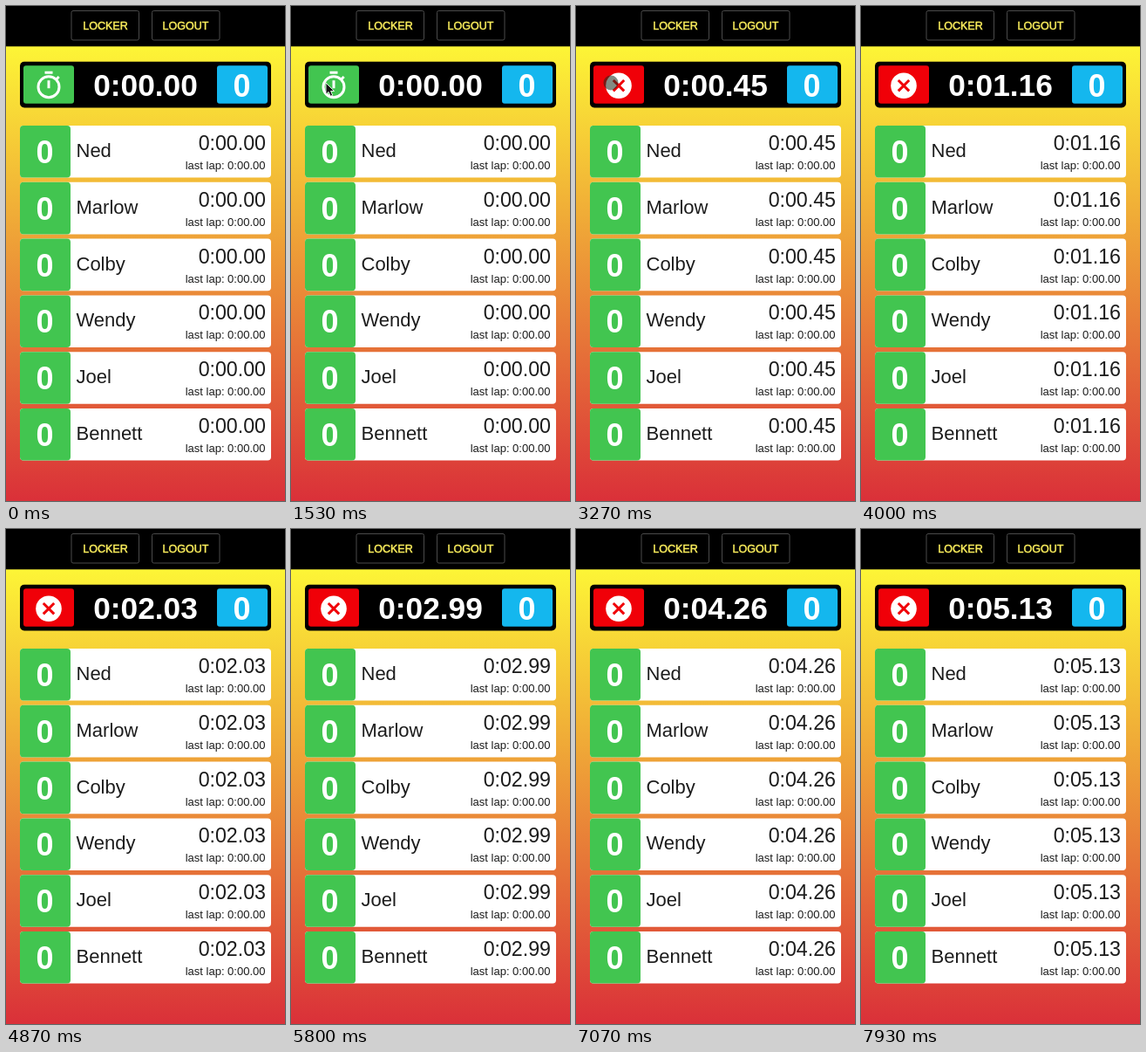
An HTML page that plays this animation: 320x567 px, repeating every 8 s.

```html
<!DOCTYPE html>
<html lang="en">
<head>
<meta charset="utf-8">
<title>Lap timer</title>
<style>
html, body { margin: 0; width: 100%; height: 100%; overflow: hidden; background: #000; }
svg { display: block; width: 100vw; height: 100vh; font-family: "Liberation Sans", Arial, sans-serif; }
.nav rect { fill: none; stroke: #4a4a4a; }
.nav text { fill: #fbee5c; stroke: #fbee5c; stroke-width: .5; font-size: 12.5px; text-anchor: middle; }
.big { fill: #fff; font-weight: bold; font-size: 36px; text-anchor: middle; }
#clock { font-size: 35.3px; }
.name { font-size: 22px; }
.time { font-size: 23.2px; text-anchor: end; }
.lap { font-size: 13px; text-anchor: end; }
.name, .time, .lap { fill: #1c1c1c; }
</style>
</head>
<body>
<svg viewBox="0 0 320 567" preserveAspectRatio="none">
  <defs>
    <linearGradient id="sky" x1="0" y1="0" x2="0" y2="1">
      <stop offset="0" stop-color="#fdf536"/>
      <stop offset="1" stop-color="#da3039"/>
    </linearGradient>
  </defs>
  <rect y="46" width="320" height="521" fill="url(#sky)"/>
  <rect width="320" height="46.3" fill="#000"/>
  <g class="nav">
    <rect x="75" y="5.5" width="77.5" height="33.5" rx="2"/>
    <text x="114" y="26.8">LOCKER</text>
    <rect x="167.5" y="5.5" width="77.5" height="33.5" rx="2"/>
    <text x="206" y="26.8">LOGOUT</text>
  </g>

  <rect x="16" y="63.8" width="288" height="52.7" rx="5" fill="#000"/>
  <rect id="button" x="20" y="68.3" width="58" height="43.5" rx="3" fill="#42c550"/>
  <g id="ready" transform="translate(31 73.2) scale(1.5)" fill="none" stroke="#fff" stroke-width="2">
    <circle cx="12" cy="13" r="8"/>
    <path d="M9 2h6M12 8v6M18 7l1.8-1.8"/>
  </g>
  <g id="running" transform="translate(49 91.2)">
    <circle r="14.8" fill="#fff"/>
    <path d="M-6.2-6.2 6.2 6.2M6.2-6.2-6.2 6.2" stroke="#f00008" stroke-width="3"/>
  </g>
  <text id="clock" class="big" x="160" y="103.2"></text>
  <rect x="242" y="68.3" width="58" height="43.5" rx="3" fill="#14b7ee"/>
  <text class="big" x="270.5" y="103.6">0</text>

  <g id="rows"></g>

  <g id="pointer">
    <path id="arrow" d="M0 0V13.2L3.1 10.4 5.3 15.3 7.7 14.2 5.6 9.5H9.6Z" fill="#111" stroke="#fff" stroke-width=".9"/>
    <circle id="touch" r="8.5" fill="#1c2b1e" fill-opacity=".55"/>
  </g>
</svg>
<script>
const LOOP = 8000, FRAME = 1000 / 15;
const START = 2790, TICK = 50.8;
const HOVER = 2200;
const names = ["Ned", "Marlow", "Colby", "Wendy", "Joel", "Bennett"];
const $ = id => document.getElementById(id);

$("rows").innerHTML = names.map((name, i) => `
  <g transform="translate(16 ${137 + i * 64.8})">
    <rect width="288" height="59.6" rx="4" fill="#fff"/>
    <rect width="58" height="59.6" rx="4" fill="#42c550"/>
    <text class="big" x="28.5" y="43">0</text>
    <text class="name" x="64.5" y="36">${name}</text>
    <text class="time" x="282" y="28"></text>
    <text class="lap" x="281.5" y="50">last lap: 0:00.00</text>
  </g>`).join("");
const times = [...document.querySelectorAll(".time")];

const show = (id, on) => $(id).setAttribute("visibility", on ? "visible" : "hidden");

function ease(t, from, to) {
  const p = Math.min(1, Math.max(0, (t - from) / (to - from)));
  return p * p * (3 - 2 * p);
}

function format(ms) {
  const cs = Math.floor(ms / 10);
  const two = n => String(n).padStart(2, "0");
  return `${Math.floor(cs / 6000)}:${two(Math.floor(cs / 100) % 60)}.${two(cs % 100)}`;
}

function draw(t) {
  const on = t >= START;
  const label = format(on ? Math.floor((t - START) / TICK) * TICK : 0);
  $("clock").textContent = label;
  times.forEach(el => el.textContent = label);

  $("button").setAttribute("fill", on ? "#f00008" : "#42c550");
  show("ready", !on);
  show("running", on);

  // The pointer slides in from the left edge and leaves the same way.
  const x = -14 + 54 * (ease(t, 1000, 1400) - ease(t, 3600, 3860));
  $("pointer").setAttribute("transform", `translate(${x} 88)`);
  show("arrow", t < HOVER);
  show("touch", t >= HOVER);
}

function loop() {
  const t = performance.now() % LOOP;
  draw(Math.floor((t + 5) / FRAME) * FRAME);
  requestAnimationFrame(loop);
}
loop();
</script>
</body>
</html>
```
